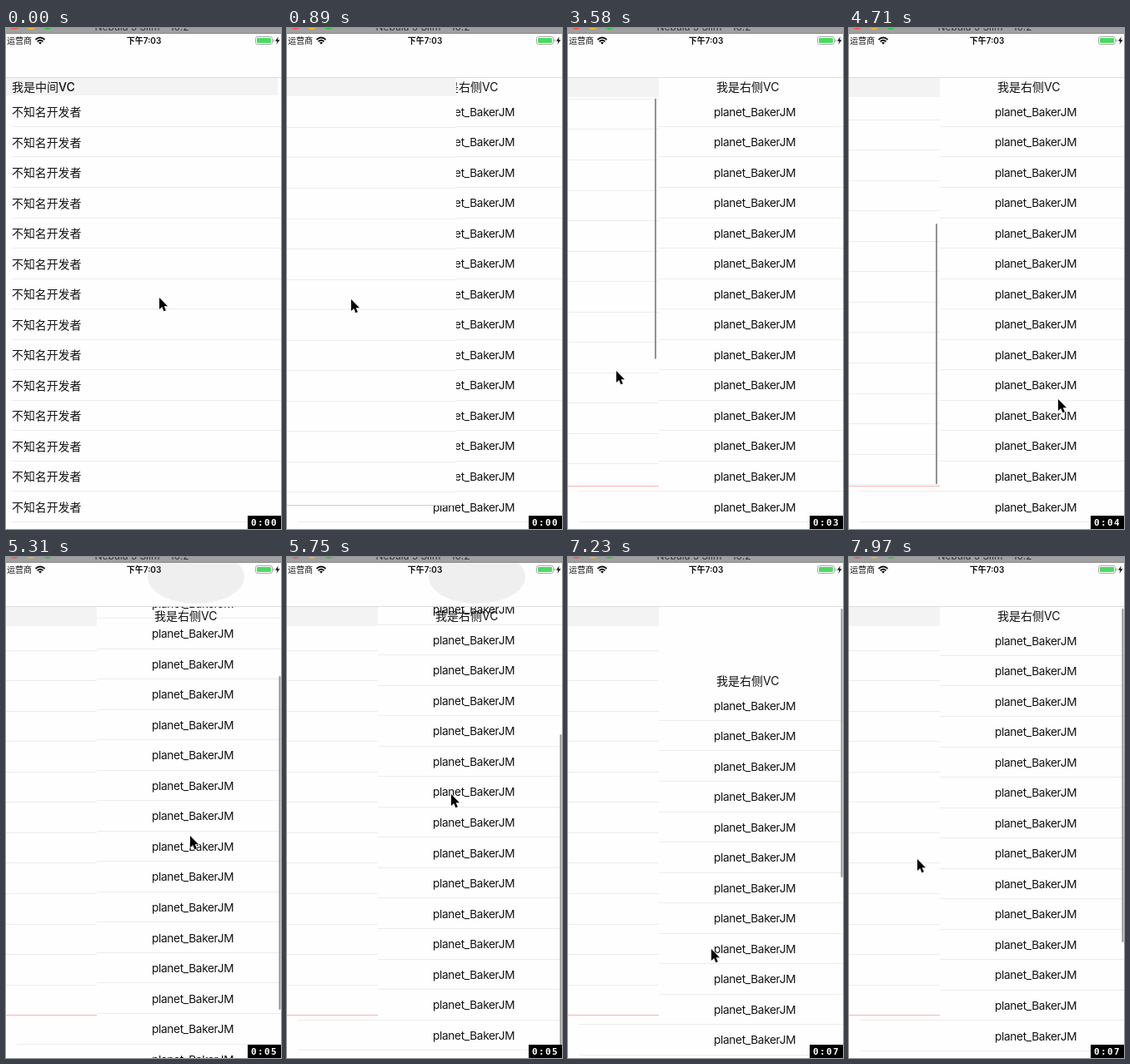
An HTML page that plays this animation: 330x602 px, repeating every 8000 ms.

```html
<!DOCTYPE html>
<html lang="zh">
<head>
<meta charset="utf-8">
<title>Sliding panels</title>
<style>
html, body { margin: 0; width: 100%; height: 100%; overflow: hidden; background: #fefefe; }
#stage { display: block; width: 330px; height: 602px; }
text { font-family: Inter, "Noto Sans CJK SC", "Noto Sans CJK", sans-serif; font-size: 14px; fill: #111; }
.cjk { font-family: "Noto Sans CJK SC", "Noto Sans CJK", sans-serif; font-size: 13.9px; }
.name { font-size: 13.6px; letter-spacing: -.3px; }
.status { font-size: 10px; }
.time { font-weight: 600; }
.clock { font: bold 11px "DejaVu Sans Mono", monospace; letter-spacing: 1.4px; fill: #fff; }
.line { fill: #ececec; }
.bar { fill: #929292; }
</style>
</head>
<body>
<svg id="stage" viewBox="0 0 330 602">
  <rect width="330" height="602" fill="#fefefe"/>

  <g id="right">
    <g id="rightRows"></g>
    <text id="rightHead" x="178">我是右侧VC</text>
  </g>

  <svg id="mid" width="335">
    <rect width="335" height="700" fill="#fefefe"/>
    <g id="midRows"></g>
    <rect id="midHead" y="60" width="335" fill="#f3f3f3"/>
    <text id="midTitle" x="16" font-weight="500">我是中间VC</text>
    <rect id="midBar" class="bar" x="330" width="2" height="313" rx="1"/>
    <rect id="midEdge" width="335" height="1"/>
  </svg>
  <rect id="rightBar" class="bar" x="327.5" width="2" rx="1"/>

  <svg width="330" height="59">
    <rect width="330" height="59" fill="#fefefe"/>
    <ellipse id="haze" cx="228" cy="24" rx="58" ry="32" fill="#efefef"/>
    <rect width="330" height="7" fill="#a0a0a0"/>
    <rect y="6" width="330" height="1" fill="#8a8a8a"/>
    <circle cx="10" cy="-4" r="6" fill="#f4574f"/>
    <circle cx="30" cy="-4" r="6" fill="#f5b52e"/>
    <circle cx="50" cy="-4" r="6" fill="#34c441"/>
    <text x="163" y="3" text-anchor="middle" style="font-size:12px;fill:#333">Nebula 5 Slim - 10.2</text>
    <text class="status" x="1" y="19">运营商</text>
    <g fill="none" stroke="#111" stroke-width="1.8">
      <path d="M35.5 14Q41 9 46.500 14M37.500 16.300Q41 13.200 44.500 16.300"/>
    </g>
    <path d="M39 17.600Q41 16 43 17.600L41 19.700Z" fill="#111"/>
    <text class="status time" x="165.500" y="19" text-anchor="middle">下午7:03</text>
    <rect x="299.500" y="10.500" width="20" height="9" rx="2.200" fill="#fff" stroke="#a8a8a8"/>
    <rect x="301" y="12" width="17" height="6" rx="1" fill="#4cd964"/>
    <rect x="320.500" y="13.500" width="1.300" height="3" rx=".6" fill="#a8a8a8"/>
    <path d="M326.800 10.500L323 15.800H325.500L324.400 19.800L328.600 14.300H326Z" fill="#111"/>
  </svg>
  <rect y="59" width="330" height="1" fill="#dcdcdc"/>

  <path id="cursor" d="M0 0V14L3.200 11.100L5.400 16.300L7.900 15.200L5.700 10.200H10Z" fill="#000" stroke="#fff" stroke-width="1.200" paint-order="stroke"/>

  <rect x="290" y="586" width="40" height="16" fill="#000"/>
  <text id="clock" class="clock" x="294" y="598">0:00</text>
</svg>
<script>
const $ = id => document.getElementById(id);
const set = (id, attrs) => {
  for (const k in attrs) $(id).setAttribute(k, attrs[k]);
};
const LOOP = 8000, ROW = 36.54, ROWS = 20;

// Bursts of motion: first change, last change, number of steps
const bursts = [
  [150, 1140, 8], [1290, 1740, 4], [2040, 2280, 3], [3030, 3280, 3],
  [3580, 4560, 8], [4710, 5750, 8], [5900, 6790, 7], [7230, 7970, 6]
];

// Tracks: [burst position, value, ...]
const edgeTrack = [[0, 326], [.25, 296], [.5, 244], [.75, 203], [1, 185], [1.5, 132], [2, 109]];
const midTrack = [[4, 0], [4.25, 70], [4.625, 232], [4.875, 266], [5.125, 266], [5.375, 264.5]];
const rightTrack = [
  [5.125, 0], [5.375, 36], [5.625, 118], [5.875, 206], [6, 220.2],
  [6.15, 205], [6.5, 75], [6.85, -62], [7, -78], [7.17, -78],
  [7.34, -45], [7.51, -15], [7.68, -4], [7.84, 0]
];
const cursorTrack = [
  [0, 184, 324], [.75, 77, 326], [1, 62, 328], [2, 72, 337], [3, 99, 385],
  [4, 57, 450], [4.625, 64, 262], [4.8, 72, 270], [5, 175, 410], [5.125, 251, 446],
  [5.375, 246, 412], [5.75, 208, 296], [6, 197, 285], [6.15, 195, 290],
  [6.85, 174, 462], [7, 172, 471], [7.17, 172, 471], [7.5, 140, 440], [8, 82, 363]
];

function at(track, u, col = 1) {
  let a = track[0];
  for (const b of track) {
    if (u < b[0]) {
      const f = a === b ? 0 : (u - a[0]) / (b[0] - a[0]);
      return a[col] + (b[col] - a[col]) * f;
    }
    a = b;
  }
  return a[col];
}

// Hold the picture between steps, as the screen recording does
function stepAt(t) {
  let u = 0, time = 0;
  bursts.forEach(([start, end, n], i) => {
    if (t < start) return;
    const k = Math.min(n - 1, Math.floor((t - start) / (end - start) * (n - 1) + 1e-6));
    u = i + (k + 1) / n;
    time = start + (end - start) * k / (n - 1);
  });
  return { u, time };
}

function rows(id, x, lineX, label, cls, base) {
  let out = "";
  for (let i = 0; i < ROWS; i++) {
    const y = ROW * i;
    out += `<text class="${cls}" x="${x}" y="${(base + y).toFixed(2)}">${label}</text>` +
      `<rect class="line" x="${lineX}" y="${Math.floor(118.4 + y)}" width="340" height="1"/>`;
  }
  $(id).innerHTML = out;
}

function draw(t) {
  const { u, time } = stepAt(t);

  const edge = at(edgeTrack, u);
  const drop = 2 * (326 - edge) / 217;
  const bottom = 551 + .24 * (edge - 109);
  const mid = at(midTrack, u);
  set("mid", { x: Math.round(edge) - 335, height: Math.round(bottom) });
  set("midRows", { transform: `translate(0 ${Math.round(drop - mid)})` });
  set("midHead", { height: Math.round(21 + drop) });
  set("midTitle", { y: 76 + drop });
  set("midEdge", { y: Math.round(bottom) - 1, fill: u > 2.1 ? "#f6b4b4" : "#cfcfcf" });
  set("midBar", { y: 62 + mid * .65, opacity: u > 4.05 && u < 5.2 ? 1 : 0 });

  const right = at(rightTrack, u);
  set("rightRows", { transform: `translate(0 ${-Math.round(right)})` });
  set("rightHead", { y: 76 + Math.max(0, Math.round(-right)) });
  set("rightBar", {
    y: 62 + Math.max(0, right) * .686,
    height: 401 + Math.min(0, right),
    opacity: u > 5.2 ? 1 : 0
  });
  set("haze", { opacity: Math.max(0, Math.min(1, (right - 30) / 20)) });

  const x = Math.round(at(cursorTrack, u, 1)), y = Math.round(at(cursorTrack, u, 2));
  set("cursor", { transform: `translate(${x} ${y})` });
  $("clock").textContent = "0:0" + Math.floor(time / 1000 + 1e-6);
}

rows("midRows", 16, 16, "不知名开发者", "cjk", 106);
rows("rightRows", 175, 13, "planet_BakerJM", "name", 105.5);

const begin = performance.now();
function tick() {
  draw((performance.now() - begin) % LOOP);
  requestAnimationFrame(tick);
}
tick();
</script>
</body>
</html>
```
